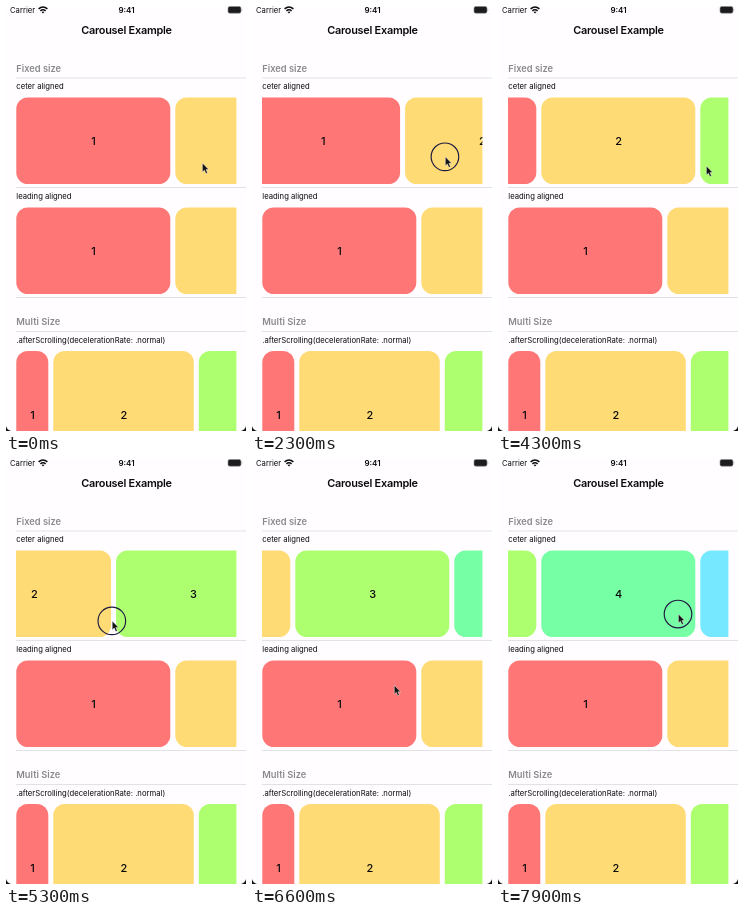
An HTML page for the animation above (8000 ms loop, 240 by 425 pixels).

```html
<!DOCTYPE html>
<html lang="en">
<head>
<meta charset="utf-8">
<title>Carousel Example</title>
<style>
  html, body { margin: 0; width: 100%; height: 100%; overflow: hidden; background: #fffdff; }
  svg { display: block; width: 100vw; height: 100vh; }
  text { font-family: Inter, Roboto, "Liberation Sans", sans-serif; fill: #0a0a0c; }
  .small { font-size: 7.7px; }
  .title { font-size: 10.9px; font-weight: 600; letter-spacing: -.25px; text-anchor: middle; }
  .head { font-size: 9.3px; font-weight: 600; fill: #8a8a8c; }
  .clock { font-size: 8px; font-weight: 600; text-anchor: middle; }
  .num { font-size: 11px; font-weight: 500; text-anchor: middle; }
  .rule { stroke: #e2e1e4; stroke-width: 1; }
</style>
</head>
<body>
<svg viewBox="0 0 240 425" preserveAspectRatio="none">
  <defs><clipPath id="view"><rect x="10" y="85" width="220.4" height="340"/></clipPath></defs>
  <rect width="240" height="425" fill="#fffdff"/>

  <text class="small" x="4" y="7">Carrier</text>
  <g fill="none" stroke="#0a0a0c" stroke-width="1.5">
    <path d="M32.6 2.9Q37 -1 41.4 2.9"/>
    <path d="M34.4 4.9Q37 2.6 39.6 4.9"/>
  </g>
  <path d="M35.6 6L37 7.5L38.4 6Q37 5 35.6 6Z" fill="#0a0a0c"/>
  <text class="clock" x="120.5" y="7">9:41</text>
  <rect x="222" y=".4" width="13" height="6.8" rx="1.8" fill="#1c1c1e" stroke="#8a8a8e" stroke-width=".6"/>
  <path d="M235.7 2.7Q237.2 3.8 235.7 4.9Z" fill="#8a8a8e"/>

  <text class="title" x="120.5" y="28">Carousel Example</text>
  <text class="head" x="10.3" y="66">Fixed size</text>
  <text class="small" x="10.3" y="83">ceter aligned</text>
  <text class="small" x="10.3" y="193">leading aligned</text>
  <text class="head" x="10.3" y="319.3">Multi Size</text>
  <text class="small" x="10.3" y="336.6">.afterScrolling(decelerationRate: .normal)</text>
  <path class="rule" d="M10 72H240M10 181.5H240M10 291.5H240M10 325.5H240"/>

  <g clip-path="url(#view)">
    <g id="centered"></g>
    <g id="leading"></g>
    <g id="multi"></g>
  </g>
  <path d="M0 420V425H5Q1 424 0 420ZM240 420V425H235Q239 424 240 420Z" fill="#111"/>

  <g id="pointer">
    <circle id="ring" r="13.8" fill="none" stroke="#1c1a40" stroke-width="1.15"/>
    <path d="M.4 0V9L2.4 7.2L3.9 10.6L5.5 9.9L4 6.6H6.7Z" fill="#141416" stroke="#fff" stroke-opacity=".7" stroke-width=".6"/>
  </g>
</svg>
<script>
const LOOP = 8000, TICK = 100, CARD = 154, GAP = 5, SETTLE = 500;
const COLORS = ['#ff7676', '#ffdb76', '#adff70', '#76ffa4', '#76e8ff'];
const $ = id => document.getElementById(id);

function add(parent, tag, attrs, label) {
  const el = document.createElementNS('http://www.w3.org/2000/svg', tag);
  for (const k in attrs) el.setAttribute(k, attrs[k]);
  if (label) el.textContent = label;
  parent.append(el);
}

function row(id, widths, y, h) {
  let x = 10.3;
  widths.forEach((w, i) => {
    add($(id), 'rect', { x, y, width: w, height: h, rx: 11.5, fill: COLORS[i] });
    add($(id), 'text', { class: 'num', x: x + w / 2 + .3, y: y + h / 2 + 3.9 }, String(i + 1));
    x += w + GAP;
  });
}
row('centered', Array(5).fill(CARD), 91.5, 86.5);
row('leading', [CARD, CARD], 201.5, 86.5);
row('multi', [32, 140.5, CARD], 345, 128);

// The pointer arrives, presses, drags until stop and lets go at up.
const STROKES = [
  { arrive: 0, down: 0, stop: 0, up: 1100, from: [196, 157], to: [196, 157] },
  { arrive: 1900, down: 2100, stop: 3200, up: 3500, from: [222, 149], to: [91, 157] },
  { arrive: 4000, down: 4580, stop: 5900, up: 6100, from: [208, 160], to: [45, 163] },
  { arrive: 6900, down: 7000, stop: 7400, up: 7400, from: [200, 165], to: [60, 164], dip: 67 },
  { arrive: 7900, down: 7900, stop: 8000, up: 8000, from: [180, 155], to: [180, 155] }
];

const ramp = (t, a, b) => Math.min(1, Math.max(0, (t - a) / (b - a || 1)));
const easeOut = (p, power) => 1 - (1 - p) ** power;
const mix = (a, b, p) => a + (b - a) * p;
const mixPoint = (a, b, p) => [mix(a[0], b[0], p), mix(a[1], b[1], p)];

// Scroll offset that centres card n; the first card rests at the edge.
const page = n => n > 0 ? n * (CARD + GAP) - 33 : 0;
const pull = (s, x) => Math.max(0, 1.04 * (s.from[0] - x) - 14);

function pose(t) {
  const i = STROKES.findIndex(s => t < s.up), s = STROKES[i];
  if (t >= s.down) {
    const [x, y] = mixPoint(s.from, s.to, easeOut(ramp(t, s.down, s.stop), 1.25));
    return { x, y, scroll: page(i - 1) + pull(s, x), pressed: i > 0 };
  }
  const last = STROKES[i - 1];
  const hop = ramp(t, last.up, s.arrive);
  const [x, y] = mixPoint(last.to, s.from, hop);
  const released = page(i - 2) + pull(last, last.to[0]);
  return {
    x, y: y + (s.dip || 0) * Math.sin(Math.PI * hop),
    scroll: mix(released, page(i - 1), easeOut(ramp(t, last.up, last.up + SETTLE), 3)),
    pressed: false
  };
}

const start = performance.now();
function draw() {
  const t = Math.floor((performance.now() - start) % LOOP / TICK) * TICK;
  const { x, y, scroll, pressed } = pose(t);
  $('centered').setAttribute('transform', `translate(${-scroll} 0)`);
  $('pointer').setAttribute('transform', `translate(${x} ${y})`);
  $('ring').setAttribute('visibility', pressed ? 'visible' : 'hidden');
  requestAnimationFrame(draw);
}
draw();
</script>
</body>
</html>
```
